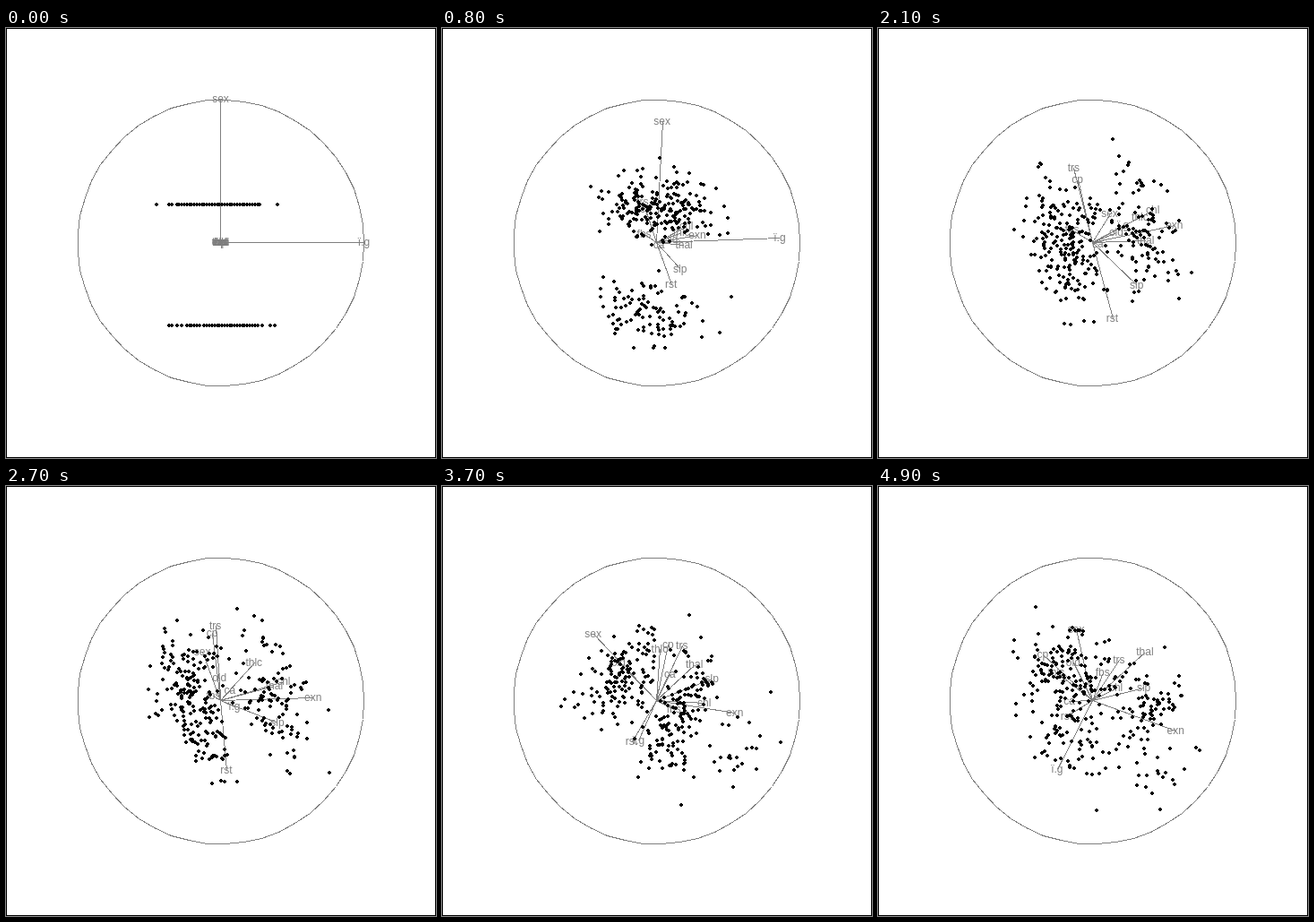
These frames come from a looping animation (480 by 480 pixels, 5000 ms). An HTML page:

```html
<!DOCTYPE html>
<html>
<head>
<meta charset="utf-8">
<style>
  html, body { margin: 0; width: 100%; height: 100%; overflow: hidden; background: #fff; }
  svg { display: block; width: 480px; height: 480px; }
  .line { fill: none; stroke: #7f7f7f; shape-rendering: crispEdges; }
  text { font: 12px "Liberation Sans", Arial, sans-serif; fill: #7f7f7f; text-anchor: middle; }
</style>
</head>
<body>
<svg viewBox="0 0 480 480">
  <rect x=".5" y=".5" width="479" height="479" fill="#fff" stroke="#000"/>
  <path id="ring" class="line"/>
  <path id="axes" class="line"/>
  <g id="labels"></g>
  <path id="dots"/>
</svg>
<script>
const el = id => document.getElementById(id);
const MID = 239.49, RADIUS = 160, SPREAD = 135, PEOPLE = 303, MEN = 207;

// The tour starts with age across and sex up; each axis tip then passes these points
const stops = [0, 20, 39, 49];
const tips = {
  'ï.g': [[37, 23], [-30, -55], [-39, -76]],
  sex: [[25, 28], [-92, 84], [-19, 79]],
  cp: [[-20, 70], [18, 63], [-56, 52]],
  trs: [[-26, 84], [38, 59], [29, 45]],
  chl: [[66, 38], [54, -10], [26, 14]],
  fbs: [[-26, 16], [28, -14], [11, 31]],
  rst: [[27, -87], [-38, -40], [-29, -17]],
  thlc: [[55, 25], [-6, 64], [-41, 32]],
  exn: [[89, 20], [92, -20], [93, -34]],
  old: [[31, 8], [-58, 49], [-22, 42]],
  slp: [[48, -53], [67, 36], [57, 14]],
  ca: [[5, -4], [17, 35], [-26, 0]],
  thal: [[59, -2], [41, 47], [58, 54]]
};
const names = Object.keys(tips);

// Vector helpers
const span = (lo, hi) => Array.from({ length: hi - lo + 1 }, (_, i) => lo + i);
const dot = (a, b) => a.reduce((sum, v, i) => sum + v * b[i], 0);
const unit = a => { const n = Math.hypot(...a); return a.map(v => v / n); };
const slerp = (a, b, s) => {
  const angle = Math.acos(dot(a, b));
  const p = Math.sin((1 - s) * angle), q = Math.sin(s * angle);
  return a.map((v, i) => (v * p + b[i] * q) / Math.sin(angle));
};

// One x and one y vector per stop
const planes = stops.map((_, k) => [0, 1].map(dir =>
  unit(names.map((name, j) => k ? tips[name][k - 1][dir] : +(j === dir)))));

function basis(step) {
  const k = Math.max(1, stops.findIndex(at => at >= step));
  const s = (step - stops[k - 1]) / (stops[k] - stops[k - 1]);
  const [x, y] = [0, 1].map(dir => unit(slerp(planes[k - 1][dir], planes[k][dir], s)));
  const lean = dot(x, y) / 2;
  return [
    unit(x.map((v, j) => v - lean * y[j])),
    unit(y.map((v, j) => v - lean * x[j]))
  ];
}

// Seeded random helpers
let seed = 20;
const rand = () => (seed = (seed * 1664525 + 1013904223) % 4294967296) / 4294967296;
const chance = p => +(rand() < p);
const gauss = (mean, sd) =>
  mean + sd * Math.sqrt(-2 * Math.log(1 - rand())) * Math.cos(2 * Math.PI * rand());
const skewed = sd => { const g = gauss(0, 1); return sd * (g + .2 * (g * g - 1)); };

// Ages that occur for women and men
const ages = [
  [34, 35, 37, 39, ...span(41, 46), ...span(48, 69), 71, 74, 76],
  [29, 34, 35, ...span(37, 70), 77]
];

function pickAge(sex, k, well) {
  let age = ages[sex][k];
  while (!ages[sex].includes(age)) age = Math.round(gauss(well ? 52.5 : 56.6, 8.5));
  return age;
}

// Each value is scaled to a range of 1 and centred on 0
function person(i) {
  const sex = +(i < MEN);
  const well = sex ? i % 9 < 4 : i % 4 > 0;
  const age = (pickAge(sex, sex ? i : i - MEN, well) - 54.4) / 48;
  const pain = chance(well ? .76 : .25) * (1 + chance(.7) * (1 + chance(.2)));
  const slope = 2 - chance(well ? .35 : .75) * (1 + chance(.15));
  const vessels = chance(well ? .2 : .67) * (1 + chance(.5) * (1 + chance(.35)));
  const thal = 2 + chance((well ? .17 : .65) * (sex ? 1.25 : .5)) - chance(.06);
  const dip = chance(well ? .55 : .82) * Math.abs(gauss(0, .14 * (3 - slope)));
  return [
    age,
    sex - MEN / PEOPLE,
    pain / 3 - .32,
    .23 * age + skewed(.15),
    .1 * age + skewed(.11),
    chance(.15) - .15,
    chance(well ? .58 : .43) / 2 - .26,
    gauss((well ? .06 : -.07) - .26 * age, .14),
    chance((well ? .1 : .4) + (pain ? 0 : .18)) - .33,
    Math.min(1, dip) - .17,
    slope / 2 - .7,
    vessels / 4 - .18,
    thal / 3 - .77
  ];
}
const people = span(0, PEOPLE - 1).map(person);

const right = d => Math.round(MID + d);
const up = d => Math.round(MID - d);
const point = (x, y) => `${right(x) + .5} ${up(y) + .5}`;

el('ring').setAttribute('d', 'M' + span(0, 48).map(i => {
  const a = i / 49 * 2 * Math.PI;
  return point(RADIUS * Math.cos(a), RADIUS * Math.sin(a));
}).join('L') + 'Z');

const labels = names.map(name => {
  const t = document.createElementNS('http://www.w3.org/2000/svg', 'text');
  t.textContent = name;
  return el('labels').appendChild(t);
});

function draw(step) {
  const [x, y] = basis(step);
  el('axes').setAttribute('d', names.map((_, j) =>
    `M${point(0, 0)}L${point(RADIUS * x[j], RADIUS * y[j])}`).join(''));
  labels.forEach((t, j) => {
    t.setAttribute('x', MID + RADIUS * x[j]);
    t.setAttribute('y', up(RADIUS * y[j]) + 4);
  });
  el('dots').setAttribute('d', people.map(p => {
    const px = right(SPREAD * dot(p, x)), py = up(SPREAD * dot(p, y));
    return `M${px - 1} ${py - 2}h2v1h1v2h-1v1h-2v-1h-1v-2h1z`;
  }).join(''));
}

let shown = -1;
function tick() {
  const step = Math.floor(performance.now() / 100) % 50;
  if (step !== shown) draw(shown = step);
  requestAnimationFrame(tick);
}
tick();
</script>
</body>
</html>
```
